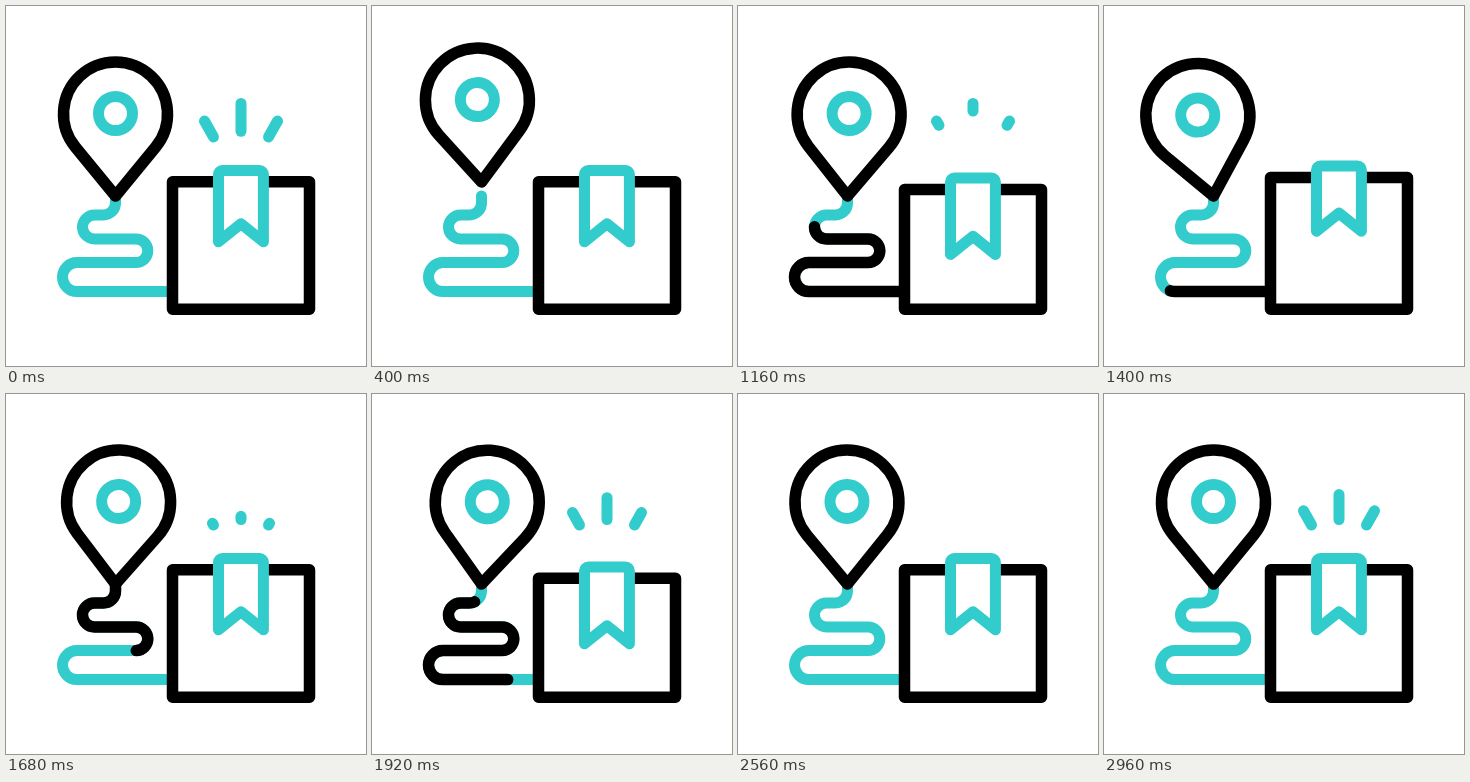
An HTML page that plays this animation: 360x360 px, repeating every 3000 ms.

```html
<!DOCTYPE html>
<html lang="en">
<head>
<meta charset="utf-8">
<title>Parcel route</title>
<style>
  html, body { margin: 0; width: 100%; height: 100%; overflow: hidden; background: #fff; }
  svg { display: block; width: 100vw; height: 100vh; }
  svg * { fill: none; stroke-width: 11; stroke-linecap: round; stroke-linejoin: round; }
  .teal { stroke: #33cccc; }
  .black { stroke: #000; stroke-width: 11.5; }
  .paper { fill: #fff; }
</style>
</head>
<body>
<svg viewBox="0 0 360 360">
  <path id="route" class="teal" d="M109.5 190V197A12 12 0 0 1 97.5 209H88.5A12 12 0 0 0 88.5 233H130A11.8 11.8 0 0 1 130 256.6H71A14.5 14.5 0 0 0 71 285.6H163"/>
  <path class="black pulse"/>
  <path class="black pulse"/>
  <g id="pin">
    <path class="black" d="M109.5 190L69.3 141A52 52 0 1 1 149.7 141Z"/>
    <circle class="teal" cx="109.5" cy="107.5" r="17"/>
  </g>
  <path id="box" class="black paper"/>
  <path id="ribbon" class="teal paper"/>
  <path class="teal ray"/>
  <path class="teal ray"/>
  <path class="teal ray"/>
</svg>
<script>
const LOOP = 3000;
const RAY_PERIOD = 1000;
const PULSE_GAP = 800;

// The pin swings to each of these angles in turn, at an even beat.
const SWINGS = [0, -4.8, 8.3, -11, 6, -5.6, 0];
const SWING_START = 170;
const SWING_BEAT = 410;

const $ = id => document.getElementById(id);
const route = $('route'), pin = $('pin'), box = $('box'), ribbon = $('ribbon');
const pulses = document.querySelectorAll('.pulse');
const rays = document.querySelectorAll('.ray');
const routeLength = route.getTotalLength();
pulses.forEach(p => p.setAttribute('d', route.getAttribute('d')));

const mix = (a, b, k) => a + (b - a) * k;
const progress = (t, from, to) => Math.min(1, Math.max(0, (t - from) / (to - from)));
const ease = k => (1 - Math.cos(Math.PI * k)) / 2;
// Rises smoothly from 0 to 1 and back between two times.
const bump = (t, from, to) => ease(2 * progress(t, from, to));

function swing(t) {
  const beat = progress(t - SWING_START, 0, SWING_BEAT * (SWINGS.length - 1)) * (SWINGS.length - 1);
  const i = Math.min(Math.floor(beat), SWINGS.length - 2);
  return mix(SWINGS[i], SWINGS[i + 1], ease(beat - i));
}

function drawPin(t) {
  const hop = -14.2 * bump(t, 100, 660);
  pin.setAttribute('transform', `translate(0 ${hop}) rotate(${swing(t)} 109.5 190)`);
}

function drawPulse(path, t) {
  const head = routeLength * progress(t, 668, 1161);
  const tail = routeLength * progress(t, 1096, 1520);
  path.style.display = head > tail ? '' : 'none';
  path.setAttribute('stroke-dasharray', `${head - tail} 1000`);
  path.setAttribute('stroke-dashoffset', -tail);
}

// The box squashes as a pulse arrives, then stretches.
function drawBox(t) {
  let squash = 0, stretch = 0;
  pulses.forEach((_, i) => {
    const local = t - i * PULSE_GAP;
    squash += bump(local, 920, 1320);
    stretch += bump(local, 1180, 1680);
  });
  const shift = 8.5 * squash - 4.5 * stretch;
  const top = 164.4 + shift;
  const end = 235.8 + 14 * squash - 11 * stretch;
  box.setAttribute('d', `M166.5 ${175.8 + shift}H303.5V303.3H166.5Z`);
  ribbon.setAttribute('d', `M212.5 ${top + 4}a4 4 0 0 1 4 -4H253.4a4 4 0 0 1 4 4V${end}L235 ${end - 18}L212.5 ${end}Z`);
}

// side is -1, 0 or 1: left, middle or right ray.
function drawRay(path, side, phase) {
  const growing = phase > RAY_PERIOD / 2;
  const outer = growing ? progress(phase, 640, RAY_PERIOD) : 1;
  const inner = growing ? 0 : progress(phase, 0, 220);
  const base = side ? 131 : 125.5;
  const length = side ? 16 : 28;
  const point = k => `${235 + side * (27.5 + 9 * k)} ${base - length * k}`;
  path.style.display = outer > inner ? '' : 'none';
  path.setAttribute('d', `M${point(inner)}L${point(outer)}`);
}

function draw(t) {
  drawPin(t);
  pulses.forEach((p, i) => drawPulse(p, t - i * PULSE_GAP));
  drawBox(t);
  rays.forEach((r, i) => drawRay(r, i - 1, t % RAY_PERIOD));
}

const start = performance.now();
function tick() {
  draw((performance.now() - start) % LOOP);
  requestAnimationFrame(tick);
}
tick();
</script>
</body>
</html>
```
